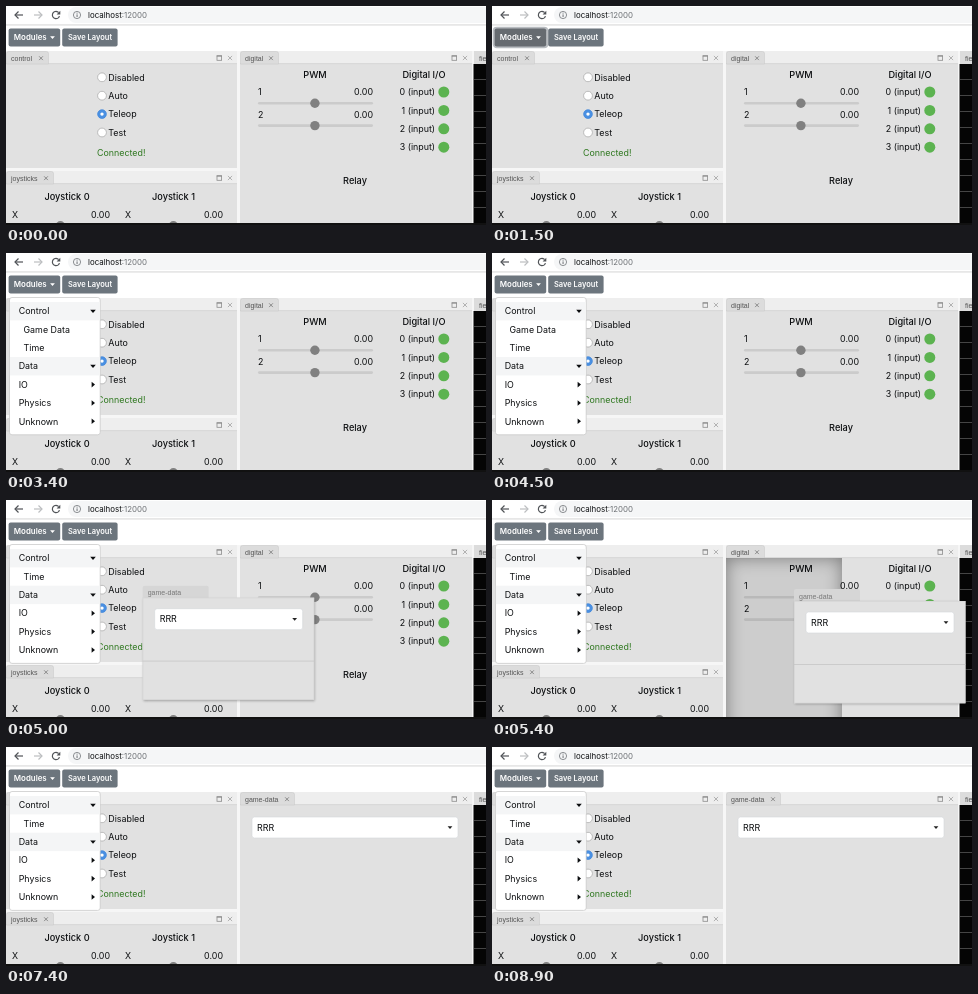
Recreate the animation shown at these times as an HTML page with a canvas. Size 480 by 219 pixels, loop 9000 ms.

```html
<!DOCTYPE html>
<html lang="en">
<head>
<meta charset="utf-8">
<title>Robot simulator modules</title>
<style>
html, body { margin: 0; width: 100%; height: 100%; overflow: hidden; background: #fff; }
canvas { display: block; width: 480px; height: 219px; }
</style>
</head>
<body>
<canvas id="stage"></canvas>
<script>
const W = 480, H = 219, LOOP = 9000, TICK = 100;
const UI = 'Inter, "Open Sans", sans-serif';
const TAB = '"Liberation Sans", Arial, sans-serif';
const PANEL = '#e1e1e1', INK = '#0c0e10', ICON = '#8c8c8c';

// Times of the interface events, in ms
const FOCUS = 1200, OPEN = 1700, DATA = 2300, CONTROL = 3300;
const DRAG = 4800, TOP_ZONE = 5500, DROP = 7000;

// Window position while dragged: time, x, y
const PATH = [[4800, 30, 77], [5100, 190, 90], [5300, 293, 91], [5400, 302, 89],
              [5800, 306, 86], [7000, 306, 86]];

const canvas = document.getElementById('stage');
const ctx = canvas.getContext('2d');
const dpr = window.devicePixelRatio || 1;
canvas.width = W * dpr;
canvas.height = H * dpr;

function rect(x, y, w, h, color) {
  ctx.fillStyle = color;
  ctx.fillRect(x, y, w, h);
}

function box(x, y, w, h, r, fill, stroke, line = 1) {
  ctx.beginPath();
  ctx.roundRect(x, y, w, h, r);
  if (fill) { ctx.fillStyle = fill; ctx.fill(); }
  if (stroke) { ctx.strokeStyle = stroke; ctx.lineWidth = line; ctx.stroke(); }
}

function disc(x, y, r, fill, stroke) {
  ctx.beginPath();
  ctx.arc(x, y, r, 0, 7);
  ctx.fillStyle = fill;
  ctx.fill();
  if (stroke) { ctx.strokeStyle = stroke; ctx.lineWidth = 0.7; ctx.stroke(); }
}

function poly(points, color, line) {
  ctx.beginPath();
  points.forEach(([x, y]) => ctx.lineTo(x, y));
  if (line) {
    ctx.strokeStyle = color;
    ctx.lineWidth = line;
    ctx.stroke();
  } else {
    ctx.fillStyle = color;
    ctx.fill();
  }
}

// y is the middle of the capitals
function text(s, x, y, { size = 8.9, weight = 400, color = INK, align = 'left', font = UI } = {}) {
  ctx.font = `${weight} ${size}px ${font}`;
  ctx.fillStyle = color;
  ctx.textAlign = align;
  ctx.fillText(s, x, y + size * 0.36);
}

const heading = (s, x, y) => text(s, x, y, { size: 9.2, weight: 500, align: 'center' });

function shadow(color, blur, dx = 0, dy = 0) {
  ctx.shadowColor = color;
  ctx.shadowBlur = blur * dpr;
  ctx.shadowOffsetX = dx * dpr;
  ctx.shadowOffsetY = dy * dpr;
}

function caretDown(x, y, r, color) {
  poly([[x - r, y - r / 2], [x + r, y - r / 2], [x, y + r / 2 + 0.4]], color);
}

function cross(x, y, r, color) {
  poly([[x - r, y - r], [x + r, y + r]], color, 0.8);
  poly([[x - r, y + r], [x + r, y - r]], color, 0.8);
}

function browserBar() {
  rect(0, 0, W, 18, '#fff');
  box(62, 1, 440, 16, 8, '#f5f6f7');
  const arrow = (x, dir, color) => {
    poly([[x - 4 * dir, 9], [x + 4 * dir, 9]], color, 1.2);
    poly([[x + 0.5 * dir, 5.5], [x + 4 * dir, 9], [x + 0.5 * dir, 12.5]], color, 1.2);
  };
  arrow(13, -1, '#505357');
  arrow(32, 1, '#bcbec0');
  ctx.beginPath();
  ctx.arc(50, 9, 3.6, 0.3, 5.5);
  ctx.strokeStyle = '#505357';
  ctx.lineWidth = 1.2;
  ctx.stroke();
  poly([[54.3, 4.8], [54.3, 8.5], [50.6, 8.5]], '#505357');
  disc(71, 9, 3.6, '#f5f6f7', '#5f6368');
  rect(70.6, 8.4, 0.9, 2.6, '#5f6368');
  rect(70.6, 6.7, 0.9, 0.9, '#5f6368');
  text('localhost', 82, 9, { size: 7.9 });
  const w = ctx.measureText('localhost').width;
  text(':12000', 82 + w, 9, { size: 7.9, color: '#6c7074' });
}

function toolbar(focused) {
  rect(0, 18, W, 27, '#fff');
  rect(0, 18.5, W, 0.9, '#cfcfcf');
  if (focused) box(1.8, 21.8, 53.4, 19.4, 3, null, '#b8bcc0', 2.2);
  box(2.6, 22.5, 51.6, 18, 2, focused ? '#666b70' : '#6c757d');
  const label = { size: 7.9, color: '#fff', weight: 600 };
  text('Modules', 7.8, 31.5, label);
  caretDown(46.5, 31.5, 2.4, '#fff');
  box(56.2, 22.5, 55.4, 18, 2, '#6c757d');
  text('Save Layout', 84, 31.5, { ...label, size: 7.5, align: 'center' });
}

function pane(x, y, w, h, title, tabW, fill = PANEL) {
  rect(x, y, w, 13, '#eeeeee');
  rect(x, y + 13, w, h - 13, fill);
  rect(x, y + 12.4, w, 0.7, '#cccccc');
  box(x + 0.5, y + 0.5, tabW, 12.5, [2, 2, 0, 0], '#dcdcdc', '#cccccc', 0.6);
  text(title, x + 5, y + 7, { size: 7, font: TAB, color: '#555' });
  cross(x + tabW - 7, y + 7.2, 1.9, '#777');
  const right = x + w;
  ctx.strokeStyle = ICON;
  ctx.lineWidth = 0.8;
  ctx.strokeRect(right - 20, y + 4.9, 4.6, 4.4);
  rect(right - 20.3, y + 4.4, 5.2, 1.1, ICON);
  cross(right - 7, y + 7, 2.1, '#a2a2a2');
}

function slider(label, x, y, w) {
  text(label, x, y);
  text('0.00', x + w, y, { align: 'right' });
  box(x, y + 10, w, 2.6, 1.3, '#cbcbcb');
  disc(x + w / 2 - 0.6, y + 11.3, 4.7, '#808080');
}

function controlPane() {
  pane(0, 45, 231, 117, 'control', 42);
  ['Disabled', 'Auto', 'Teleop', 'Test'].forEach((name, i) => {
    const y = 71.3 + 18.4 * i, on = name === 'Teleop';
    disc(96, y, 4.4, on ? '#4a90e2' : '#fff', on ? '#4086da' : '#a5a5a5');
    if (on) disc(96, y, 1.7, '#fff');
    text(name, 102.3, y);
  });
  text('Connected!', 91, 147, { color: '#2f7820' });
}

function joystickPane() {
  pane(0, 165, 231, 54, 'joysticks', 47);
  for (let i = 0; i < 2; i++) {
    heading('Joystick ' + i, 61 + 106.5 * i, 191);
    slider('X', 6 + 113 * i, 208.5, 98);
  }
}

function digitalPane() {
  pane(234, 45, 232, 174, 'digital', 38);
  heading('PWM', 309, 69);
  heading('Digital I/O', 418, 69);
  slider('1', 252, 86, 115);
  slider('2', 252, 108.3, 115);
  for (let i = 0; i < 4; i++) {
    const y = 86 + 18.4 * i;
    text(i + ' (input)', 429.1, y, { align: 'right' });
    disc(437.8, y, 5.5, '#5cb350');
  }
  heading('Relay', 349, 175);
}

function fieldPane() {
  rect(468, 45, 12, 13, '#dcdcdc');
  text('field', 473, 52, { size: 7, font: TAB, color: '#555' });
  rect(467.5, 58, 12.5, 161, '#050505');
  for (let y = 73; y < H; y += 16) rect(468, y, 12, 0.8, '#555');
}

function select(x, y, w) {
  box(x, y, w, 21, 2.5, '#fff', '#d4d7da', 0.6);
  text('RRR', x + 5, y + 10.5);
  caretDown(x + w - 8, y + 10.5, 2.4, '#222');
}

function menu(t) {
  const control = t >= CONTROL;
  const rows = [['Control', control]];
  if (control) {
    if (t < DRAG) rows.push(['Game Data']);
    rows.push(['Time']);
  }
  rows.push(['Data', t >= DATA], ['IO', false], ['Physics', false], ['Unknown', false]);

  box(3.5, 44.5, 90.7, 18.4 * rows.length + 8.5, 2.5, '#fff', '#c4c4c4', 0.7);
  rows.forEach(([name, open], i) => {
    const y = 58.2 + 18.35 * i, child = open === undefined;
    if (open) {
      rect(3.9, y - 9.2, 89.9, 18.4, '#f4f5f6');
      caretDown(87, y, 2.8, INK);
    } else if (!child) {
      poly([[85.6, y - 2.8], [85.6, y + 2.8], [89, y]], INK);
    }
    text(name, child ? 17.5 : 12.7, y);
  });
}

function dragPosition(t) {
  const i = Math.max(1, PATH.findIndex(p => p[0] >= t));
  const [t0, x0, y0] = PATH[i - 1], [t1, x1, y1] = PATH[i];
  const k = (t - t0) / (t1 - t0);
  return [x0 + (x1 - x0) * k, y0 + (y1 - y0) * k];
}

// Shaded drop area with a soft shadow along its inner edge
function dropZone(x, y, w, h) {
  rect(x, y, w, h, 'rgba(0,0,0,0.09)');
  ctx.save();
  ctx.beginPath();
  ctx.rect(x, y, w, h);
  ctx.clip();
  shadow('rgba(0,0,0,0.4)', 17);
  ctx.beginPath();
  ctx.rect(x - 60, y - 60, w + 120, h + 120);
  ctx.rect(x, y, w, h);
  ctx.fillStyle = '#000';
  ctx.fill('evenodd');
  ctx.restore();
}

function floatingWindow(x, y) {
  box(x, y, 66, 13, [2, 2, 0, 0], '#d6d6d6');
  text('game-data', x + 5, y + 7, { size: 7, font: TAB, color: '#777' });
  ctx.save();
  shadow('rgba(0,0,0,0.3)', 2.4, 1, 1);
  rect(x, y + 12, 171.5, 102.3, '#e1e1e1');
  ctx.restore();
  ctx.strokeStyle = '#d2d2d2';
  ctx.lineWidth = 0.6;
  ctx.strokeRect(x + 0.3, y + 12.3, 170.9, 101.7);
  rect(x, y + 75, 171.5, 0.8, '#c6c6c6');
  select(x + 12, y + 23, 148);
}

function draw(t) {
  ctx.setTransform(dpr, 0, 0, dpr, 0, 0);
  rect(0, 0, W, H, '#f6f6f6');
  browserBar();
  toolbar(t >= FOCUS && t < CONTROL);
  controlPane();
  joystickPane();
  if (t < DROP) {
    digitalPane();
  } else {
    pane(234, 45, 232, 174, 'game-data', 54);
    select(246, 70, 206);
  }
  fieldPane();
  if (t >= OPEN) menu(t);
  if (t >= DRAG && t < DROP) {
    const [x, y] = dragPosition(t);
    if (x >= 234) dropZone(234, 58, t < TOP_ZONE ? 116 : 232, 300);
    floatingWindow(x, y);
  }
  rect(0, 217, W, 2, '#111');
}

const start = performance.now();
function frame() {
  const t = (performance.now() - start) % LOOP;
  draw(Math.floor(t / TICK) * TICK);
  requestAnimationFrame(frame);
}
frame();
</script>
</body>
</html>
```
